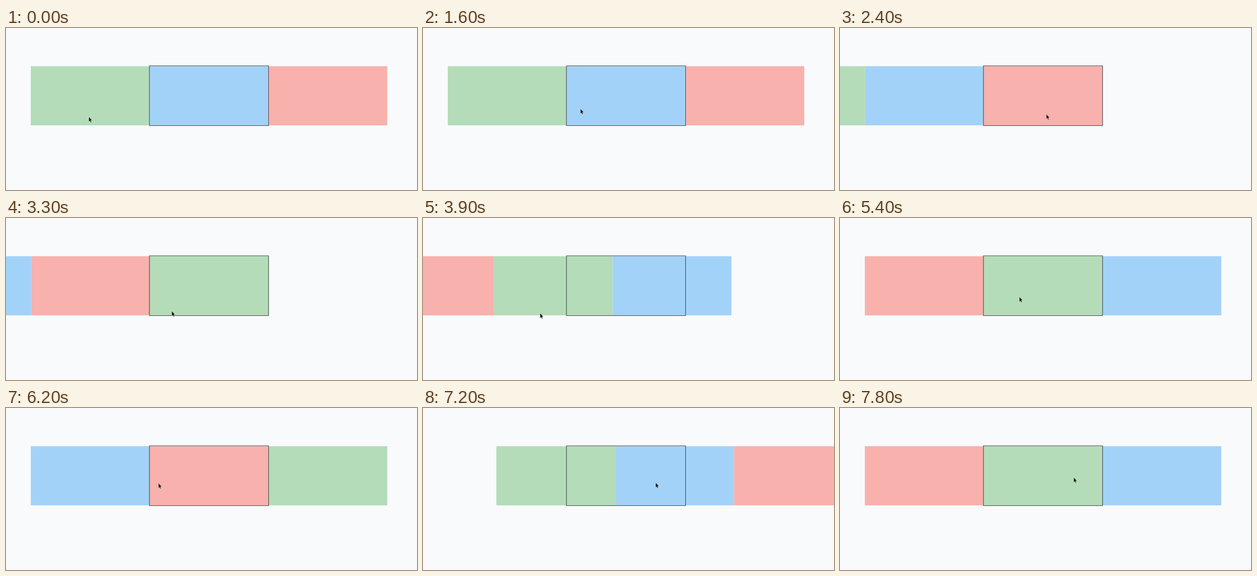
Animation of 779 by 308 pixels, one loop 8000 ms. Source, as an HTML page:

```html
<!DOCTYPE html>
<html lang="en">
<head>
<meta charset="utf-8">
<title>Looping carousel</title>
<style>
  html, body { margin: 0; width: 100%; height: 100%; overflow: hidden; background: #f9fafc; }
  svg { display: block; width: 779px; height: 308px; }
</style>
</head>
<body>
<svg viewBox="0 0 779 308">
  <g id="track">
    <rect y="72.6" width="225.2" height="112.5" fill="#b4dcb8"/>
    <rect y="72.6" width="225.2" height="112.5" fill="#a3d2f8"/>
    <rect y="72.6" width="225.2" height="112.5" fill="#f8b1ac"/>
  </g>
  <rect x="271.9" y="71.9" width="225.8" height="113.7" fill="none" stroke="#1c2126" stroke-opacity=".85"/>
  <path id="cursor" d="M0 0V9.2L2 7.4L3.4 10.6L4.9 9.9L3.5 6.8H6.2Z" fill="#141414" stroke="#fff" stroke-opacity=".5" stroke-width=".6"/>
</svg>
<script>
const LOOP = 8000, STEP = 100;
const LEFT = 47, WIDTH = 225.2;
const HOLD = 300, SETTLE = 500, PULL = 138;

// Pointer stops: when, where, and which way it drags (0 = it only rests)
const stops = [
  { at: 400, x: 157, y: 169, dir: 0 },
  { at: 1000, x: 42, y: 152, dir: 0 },
  { at: 1700, x: 498, y: 155, dir: -1 },
  { at: 2600, x: 430, y: 175, dir: -1 },
  { at: 3600, x: 360, y: 181, dir: -1 },
  { at: 4500, x: 403, y: 157, dir: 1 },
  { at: 5400, x: 340, y: 150, dir: 1 },
  { at: 6200, x: 289, y: 143, dir: 1 },
  { at: 7000, x: 349, y: 142, dir: 1 },
  { at: 7800, x: 443, y: 132, dir: 0 }
];

const slides = document.querySelectorAll('#track rect');
const cursor = document.getElementById('cursor');
const clamp = v => Math.min(1, Math.max(0, v));
const mix = (a, b, k) => a + (b - a) * k;

// Follow the pointer, then ease out to the next slot
function swipeDistance(age) {
  const rest = 1 - clamp((age - HOLD) / SETTLE);
  return age < HOLD ? PULL * clamp(age / HOLD) : mix(WIDTH, PULL, rest ** 3);
}

function trackState(t) {
  let turns = 0, offset = 0;
  for (const { at, dir } of stops) {
    const age = t - at;
    if (age >= HOLD + SETTLE) turns += dir;
    else offset += dir * swipeDistance(age);
  }
  return { turns, offset };
}

// Drag during the hold, then speed up towards the next stop
function pointerAt(t) {
  const i = Math.max(0, stops.findLastIndex(s => s.at <= t));
  const from = stops[i], to = stops[i + 1] || from;
  const age = t - from.at;
  const dragged = from.x + from.dir * PULL * clamp(age / HOLD);
  const k = to === from ? 0 : clamp((age - HOLD) / (to.at - from.at - HOLD)) ** 2;
  return [mix(dragged, to.x, k), mix(from.y, to.y, k)];
}

function draw(t) {
  const { turns, offset } = trackState(t);
  slides.forEach((slide, i) => {
    const slot = (i + turns + 3) % 3;
    slide.setAttribute('x', LEFT + slot * WIDTH + offset);
  });
  cursor.setAttribute('transform', `translate(${pointerAt(t)})`);
}

const origin = performance.now();
function tick() {
  const t = (performance.now() - origin) % LOOP;
  draw(Math.floor(t / STEP) * STEP);
  requestAnimationFrame(tick);
}
tick();
</script>
</body>
</html>
```
